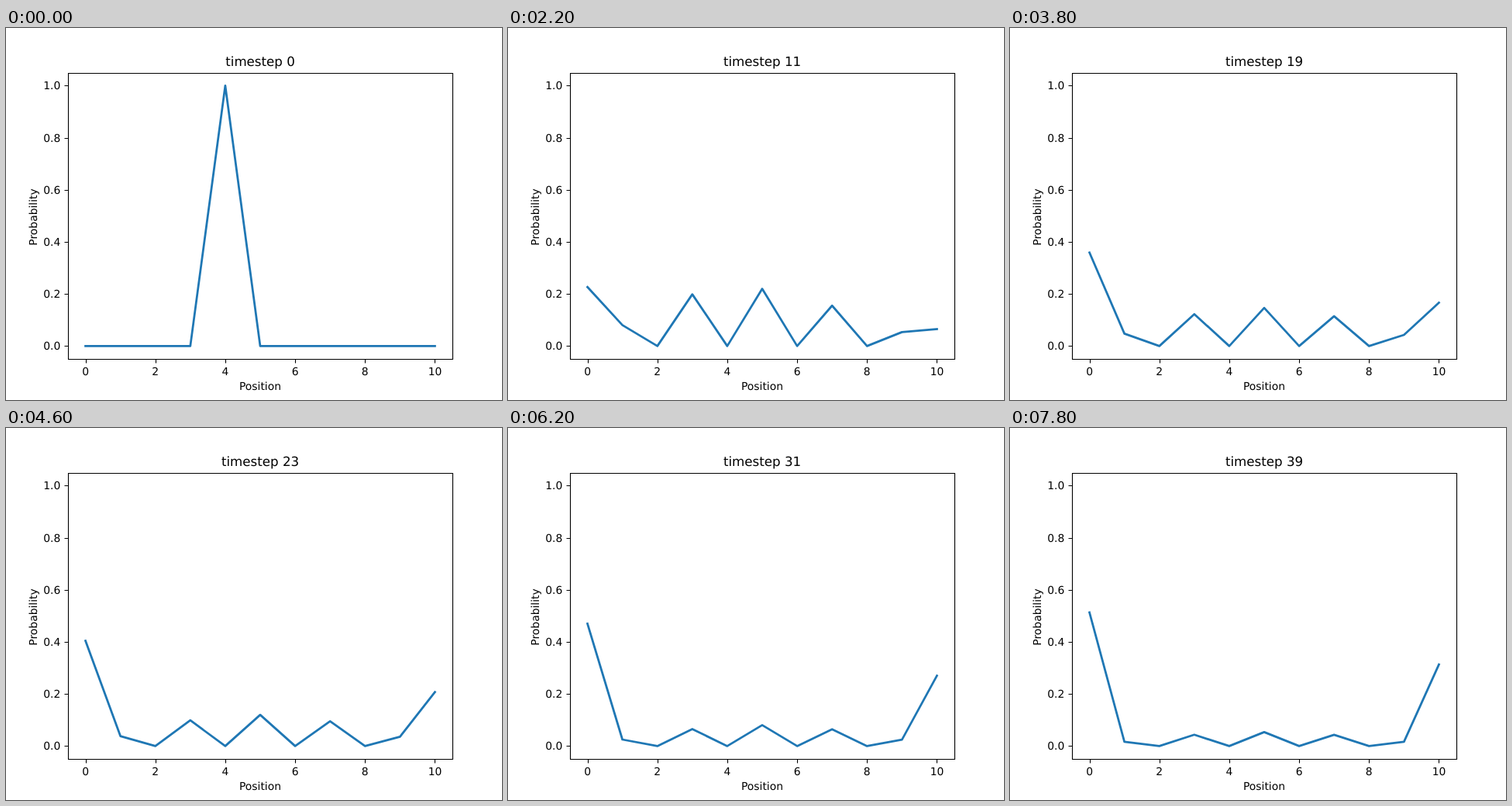
Recreate the animation shown at these times as an HTML page. Size 640 by 480 pixels, loop 8000 ms.

```html
<!DOCTYPE html>
<html lang="en">
<head>
<meta charset="utf-8">
<title>Random walk</title>
<style>
  html, body { margin: 0; width: 100%; height: 100%; overflow: hidden; background: #fff; }
  svg { display: block; }
  text {
    font: 13.889px "DejaVu Sans", sans-serif;
    text-anchor: middle;
    text-rendering: geometricPrecision;
  }
  #title { font-size: 16.667px; }
  .ytick { text-anchor: end; }
  #axes { fill: none; stroke: #000; stroke-width: 1.11; }
  #curve {
    fill: none; stroke: #1f77b4; stroke-width: 2.778;
    stroke-linecap: square; stroke-linejoin: round;
  }
</style>
</head>
<body>
<svg id="plot" width="640" height="480" viewBox="0 0 640 480">
  <polyline id="curve"/>
  <path id="axes"/>
  <text id="title" x="328" y="49"></text>
  <text x="328" y="467">Position</text>
  <text transform="translate(40 244) rotate(-90)">Probability</text>
</svg>
<script>
const STEP_MS = 200, STEPS = 40, LAST = 10, START = 4;
const $ = id => document.getElementById(id);
const px = i => 80 + 496 * (i + 0.5) / 11;
const py = p => 410.4 - 336 * p;
const snap = v => Math.floor(v + 0.5) + 0.5;

function label(x, y, str, cls) {
  const el = document.createElementNS("http://www.w3.org/2000/svg", "text");
  el.setAttribute("x", x);
  el.setAttribute("y", y);
  el.setAttribute("class", cls);
  el.textContent = str;
  $("plot").append(el);
}

function drawAxes() {
  let d = "M80.5 58.5H576.5V427.5H80.5Z";
  for (let k = 0; k <= 5; k++) {
    const x = px(2 * k), y = py(k / 5);
    d += `M${snap(x)} 427.5v5M80.5 ${snap(y)}h-5`;
    label(x, 448, 2 * k, "xtick");
    label(70.3, Math.round(y + 5), (k / 5).toFixed(1), "ytick");
  }
  $("axes").setAttribute("d", d);
}

// Symmetric random walk with absorbing ends
function advance(p) {
  const q = p.map(() => 0);
  p.forEach((v, i) => {
    if (i === 0 || i === LAST) q[i] += v;
    else { q[i - 1] += v / 2; q[i + 1] += v / 2; }
  });
  return q;
}

const walk = [Array.from({ length: LAST + 1 }, (_, i) => +(i === START))];
while (walk.length < STEPS) walk.push(advance(walk[walk.length - 1]));

let shown = -1;
function render(t) {
  const n = Math.floor(t / STEP_MS) % STEPS;
  if (n !== shown) {
    shown = n;
    $("title").textContent = "timestep " + n;
    $("curve").setAttribute("points", walk[n].map((p, i) => px(i) + "," + py(p)).join(" "));
  }
}

drawAxes();
render(0);
const t0 = performance.now();
function tick() {
  render(performance.now() - t0);
  requestAnimationFrame(tick);
}
requestAnimationFrame(tick);
</script>
</body>
</html>
```
